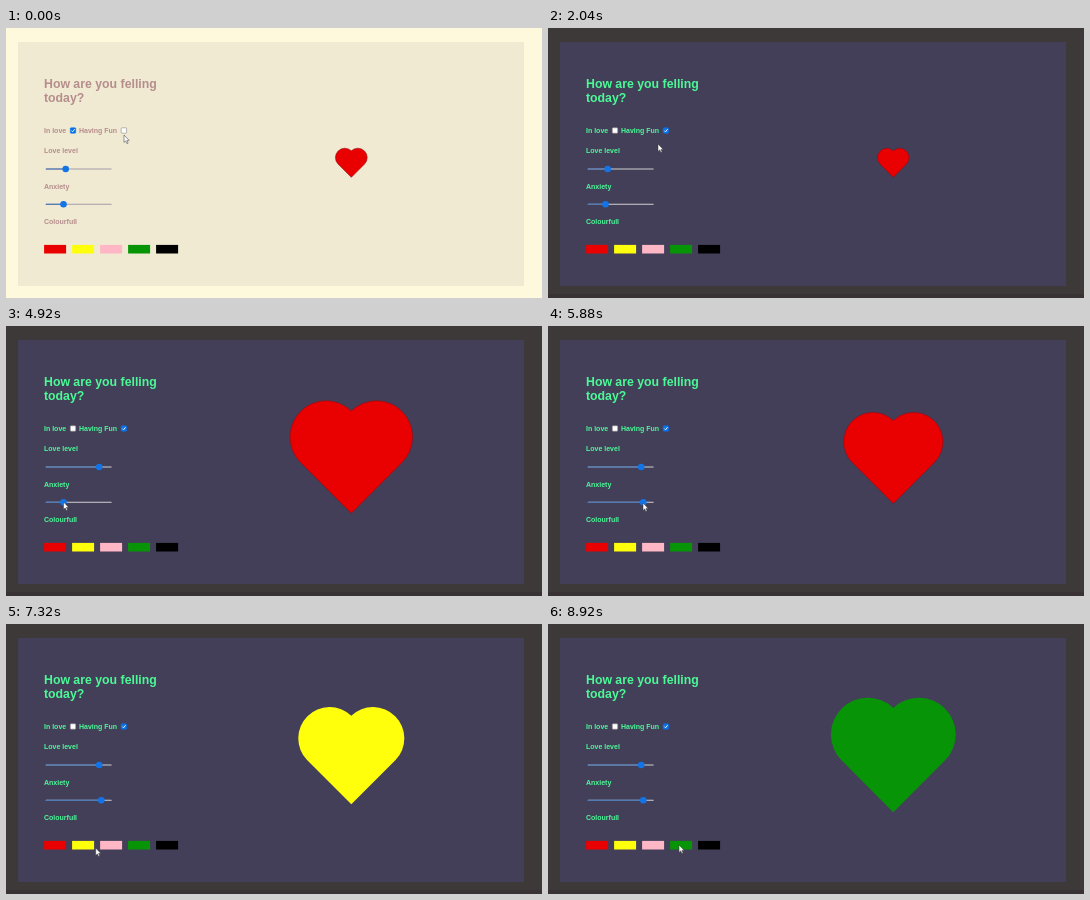
Recreate the animation shown at these times as an HTML page. Size 536x270 px, loop 8960 ms.

```html
<!DOCTYPE html>
<html lang="en">
<head>
<meta charset="utf-8">
<title>Mood heart</title>
<style>
  html, body { margin: 0; width: 100%; height: 100%; overflow: hidden; }
  svg { display: block; width: 536px; height: 270px; }
  text { font: bold 7px "Liberation Sans", Arial, sans-serif; }
  .title { font-size: 12.3px; }
</style>
</head>
<body>
<svg id="stage" viewBox="0 0 536 270" xmlns="http://www.w3.org/2000/svg">
  <rect id="page" width="536" height="270"/>
  <rect id="strip" y="266" width="536" height="4" fill="#393234"/>
  <rect id="panel" x="12" y="14" width="506" height="244"/>
  <g id="labels">
    <text class="title" x="38" y="60.1">How are you felling</text>
    <text class="title" x="38" y="74.3">today?</text>
    <text x="38" y="104.9">In love</text>
    <text x="73" y="104.9">Having Fun</text>
    <text x="38" y="125.3">Love level</text>
    <text x="38" y="160.5">Anxiety</text>
    <text x="38" y="196.2">Colourfull</text>
  </g>
  <g id="controls"></g>
  <path id="heart" d="M0 .707L-.707 0A.5 .5 0 0 1 0-.707A.5 .5 0 0 1 .707 0Z"
        stroke-width=".6" vector-effect="non-scaling-stroke"/>
  <path id="pointer" d="M0 0V7.4L1.7 5.9 2.9 8.6 4.1 8.1 2.9 5.4H5.2Z"
        fill="#fff" stroke="#333" stroke-width=".5"/>
</svg>
<script>
const LOOP = 8960;
const TIMES = { theme: 1400, grow: 4250, fast: 5850, yellow: 7000, pink: 8100, green: 8640 };
const COLORS = { red: '#e90000', yellow: '#ffff0c', pink: '#ffb6c5', green: '#079407', black: '#000' };
const LIGHT = { page: '#fef8dc', panel: '#f0ead2', text: '#b58d8d', track: '#a59ba8' };
const DARK = { page: '#3d3938', panel: '#433f58', text: '#4bfa97', track: '#d2cfd0' };

// One heartbeat: its length and a moment when the heart is largest.
const CALM = { period: 4500, peak: 1000 };
const ANXIOUS = { period: 1300, peak: 7740 };

// Each key is [time, value, ...].
const POINTER = [
  [0, 118, 107], [900, 117, 104], [1500, 117, 104], [2040, 110, 116], [2800, 65, 152],
  [3150, 62, 143], [3300, 63, 143], [3880, 86.5, 143], [4150, 95, 143], [4300, 95, 143],
  [4850, 57.5, 176], [5050, 57.5, 176], [5700, 95, 177], [5900, 95, 177],
  [6520, 77, 223], [6720, 81, 224], [7050, 81, 224], [7400, 91, 224], [7900, 106, 221],
  [8150, 106, 221], [8540, 131, 221], [LOOP, 131, 221]
];
const LOVE = [[3250, 59.7], [3880, 82.5], [4150, 93.2]];
const ANXIETY = [[5050, 57.5], [5700, 95.3]];

const $ = id => document.getElementById(id);
const set = (el, attrs) => { for (const k in attrs) el.setAttribute(k, attrs[k]); };
const add = (name, attrs) => {
  const el = document.createElementNS('http://www.w3.org/2000/svg', name);
  set(el, attrs);
  return $('controls').appendChild(el);
};
const smooth = v => v * v * (3 - 2 * v);

function track(keys, t) {
  const next = keys.findIndex(k => k[0] > t);
  if (next === 0) return keys[0].slice(1);
  if (next < 0) return keys[keys.length - 1].slice(1);
  const a = keys[next - 1], b = keys[next];
  const f = smooth((t - a[0]) / (b[0] - a[0]));
  return a.slice(1).map((v, i) => v + (b[i + 1] - v) * f);
}

function makeCheckbox(x) {
  const box = add('rect', { x, y: 99.8, width: 5.4, height: 5.4, rx: .8, 'stroke-width': .6 });
  const tick = add('path', {
    d: `M${x + 1.1} 102.6l1.2 1.2 2.1-2.6`, fill: 'none', stroke: '#fff', 'stroke-width': .9
  });
  return on => {
    set(box, { fill: on ? '#0b72e7' : '#fff', stroke: on ? '#0b72e7' : '#8a8585' });
    set(tick, { visibility: on ? 'visible' : 'hidden' });
  };
}

function makeSlider(y) {
  const bar = { x: 39.7, y: y - .5, height: 1, rx: .5 };
  const rail = add('rect', { ...bar, width: 66 });
  const fill = add('rect', { ...bar, fill: '#346bb5' });
  const thumb = add('circle', { cy: y, r: 3.3, fill: '#1274e7' });
  return (x, color) => {
    set(rail, { fill: color });
    set(fill, { width: x - 39.7 });
    set(thumb, { cx: x });
  };
}

const inLove = makeCheckbox(64.3), havingFun = makeCheckbox(115.2);
const loveSlider = makeSlider(141), anxietySlider = makeSlider(176.2);
Object.values(COLORS).forEach((fill, i) =>
  add('rect', { x: 38.1 + 28 * i, y: 216.9, width: 22, height: 8.6, fill }));

function heartSize(t) {
  const largest = t < TIMES.grow ? 20.7 : 75;
  const { period, peak } = t < TIMES.fast ? CALM : ANXIOUS;
  return largest * (.885 + .115 * Math.cos(2 * Math.PI * (t - peak) / period));
}

function heartColor(t) {
  return ['green', 'pink', 'yellow'].find(name => t >= TIMES[name]) || 'red';
}

function render(t) {
  const dark = t >= TIMES.theme, theme = dark ? DARK : LIGHT;
  set($('page'), { fill: theme.page });
  set($('panel'), { fill: theme.panel });
  set($('labels'), { fill: theme.text });
  set($('strip'), { visibility: dark ? 'visible' : 'hidden' });
  inLove(!dark);
  havingFun(dark);
  loveSlider(track(LOVE, t)[0], theme.track);
  anxietySlider(track(ANXIETY, t)[0], theme.track);

  const color = heartColor(t);
  set($('heart'), {
    transform: `translate(345.3 136.1) scale(${heartSize(t)})`,
    fill: COLORS[color],
    stroke: color === 'red' ? '#9a0812' : 'none'
  });
  set($('pointer'), { transform: `translate(${track(POINTER, t)})` });
}

const start = performance.now();
function tick() {
  render((performance.now() - start) % LOOP);
  requestAnimationFrame(tick);
}
render(0);
requestAnimationFrame(tick);
</script>
</body>
</html>
```
